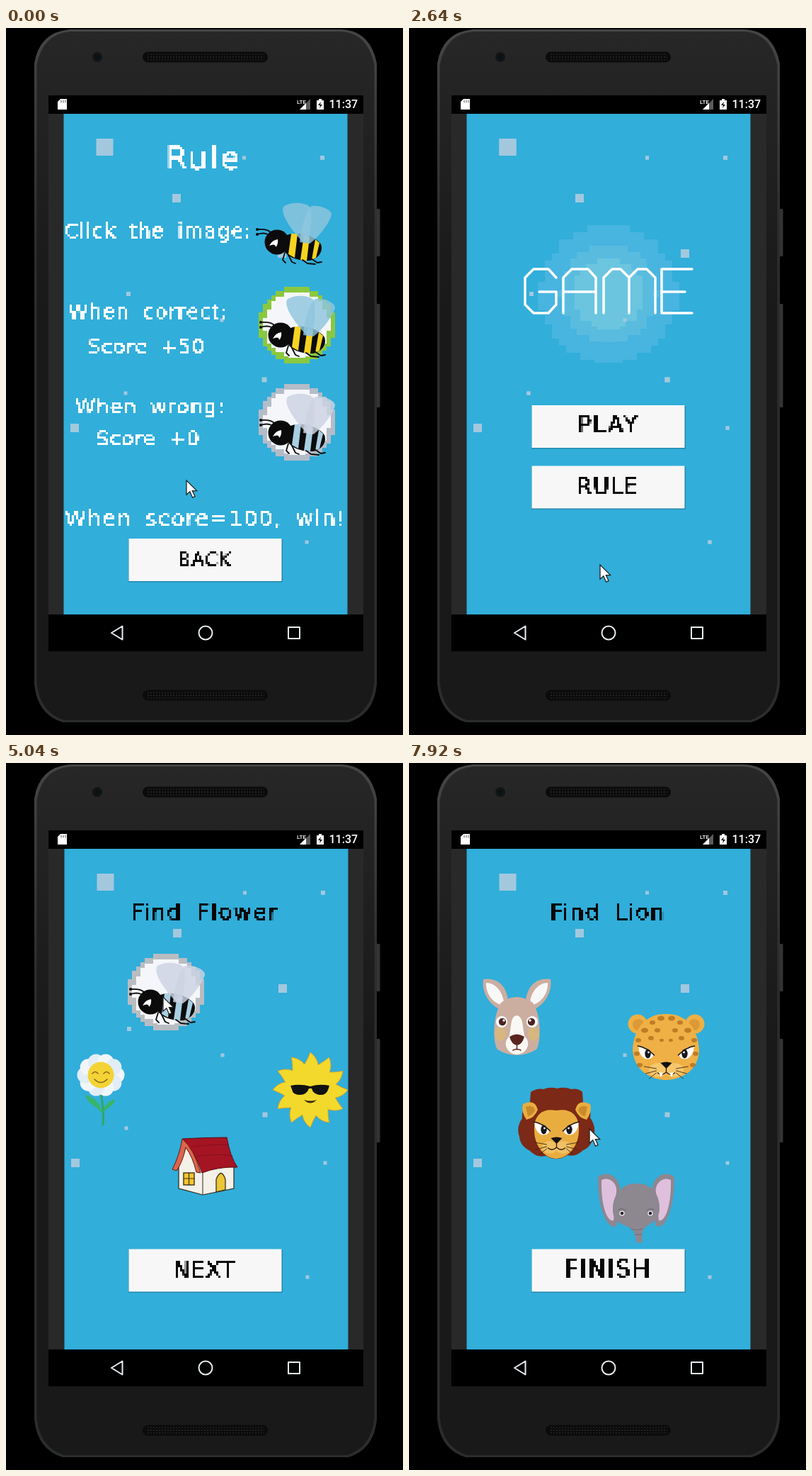
Write an HTML page that moves like this. It is 561x997 px and loops after 8000 ms.

```html
<!DOCTYPE html>
<html lang="en">
<head>
<meta charset="utf-8">
<title>Picture quiz on a phone</title>
<style>
  html, body { margin: 0; width: 100%; height: 100%; overflow: hidden; background: #000; }
  svg { display: block; width: 561px; height: 997px; }
  .label { font-family: "DejaVu Sans", sans-serif; text-anchor: middle; letter-spacing: .05em; word-spacing: .27em; stroke-width: .7; }
  .status { font-family: Roboto, sans-serif; fill: #fff; font-weight: 500; }
</style>
</head>
<body>
<svg id="stage" viewBox="0 0 561 997"></svg>
<script>
const LOOP = 8000, STEP = 240, BLUE = '#31aeda';

// ---------- helpers ----------
const path = (d, fill, extra = '') => `<path d="${d}" fill="${fill}" ${extra}/>`;
const line = (d, color, width = 1.8) =>
  path(d, 'none', `stroke="${color}" stroke-width="${width}" stroke-linecap="round" stroke-linejoin="round"`);
const rect = (x, y, w, h, fill, extra = '') =>
  `<rect x="${x}" y="${y}" width="${w}" height="${h}" fill="${fill}" ${extra}/>`;
const oval = (x, y, rx, ry, fill, extra = '') =>
  `<ellipse cx="${x}" cy="${y}" rx="${rx}" ry="${ry}" fill="${fill}" ${extra}/>`;
const dot = (x, y, r, fill, extra) => oval(x, y, r, r, fill, extra);
const at = (x, y, markup) => `<g transform="translate(${x} ${y})">${markup}</g>`;
const mirrored = (cx, markup) =>
  markup + `<g transform="translate(${2 * cx} 0) scale(-1 1)">${markup}</g>`;
const label = (text, x, y, size, color = '#fff') =>
  `<text class="label" x="${x}" y="${y}" font-size="${size}" fill="${color}" stroke="${color}">${text}</text>`;
const pixelated = markup => `<g filter="url(#pixelate)">${markup}</g>`;

const button = (y, text, size) =>
  rect(173, y + 1, 218, 60.5, '#2587ad') + rect(173.5, y, 216, 60, '#f7f7f7') +
  pixelated(label(text, 281, y + 39, size, '#080808'));

// A disc built from square cells.
function pixelDisc(cx, cy, r, cell, fill) {
  let d = '';
  for (let y = -r; y < r; y += cell) {
    const h = Math.min(cell, r - y), mid = y + h / 2;
    const half = Math.round(Math.sqrt(r * r - mid * mid) / cell) * cell;
    d += `M${cx - half} ${cy + y}h${2 * half}v${h}h${-2 * half}z`;
  }
  return path(d, fill);
}

const badge = (x, y, color) => pixelDisc(x, y, 54, 6, color) + pixelDisc(x, y, 46, 6, '#f5f6fa');

// ---------- pictures ----------
function bee(x, y, stripe = '#f5d321', wing = '#8fc6df') {
  return at(x, y,
    path('M12-9C28-17 54-9 62 3C66 14 57 24 46 26C30 27 15 21 10 12Z', '#0b0b0b') +
    path('M20-12L29-12 25 22 16 17ZM38-10L46-7 42 26 33 25ZM54-4L60 1 55 22 49 25Z', stripe) +
    path('M38 1C22-14 2-42 10-51C22-58 42-56 47-49C50-30 48-12 42 1Z', wing, 'opacity=".82"') +
    path('M32 0C34-20 40-44 49-51C60-53 78-46 77-38C72-22 54-3 46 2Z', wing, 'opacity=".82"') +
    dot(0, 0, 17.5, '#0b0b0b') +
    path('M-11 5Q-7-3 1-4Q2 3-2 7Q-2 1-11 5Z', '#fff') +
    line('M-9-14Q-14-19-27-18M-13-11Q-19-14-28-11M11 15L8 25 12 29M16 18L21 28 26 30M36 25L43 30 54 31M48 23L57 29 63 28', '#0b0b0b') +
    dot(-28, -18, 2, '#0b0b0b') + dot(-28, -11, 2, '#0b0b0b'));
}

function flower() {
  let petals = '';
  for (let i = 0; i < 10; i++) {
    const a = i * Math.PI / 5;
    petals += dot(134 + 22 * Math.cos(a), 440 + 19 * Math.sin(a), 11.5, i % 2 ? '#e2edf5' : '#f1f6fa');
  }
  return line('M134 466Q139 490 137 510', '#2fa866', 3) +
    path('M136 494C134 478 124 472 112 468C116 482 126 482 136 494ZM137 494C138 482 146 476 154 474C152 486 144 484 137 494Z', '#37b46c') +
    petals + dot(134, 440, 18.5, '#f3d335') +
    line('M122 438Q126 433 130 438M138 438Q142 433 146 438M125 446Q134 455 143 446', '#8b6a18', 1.6);
}

function sun() {
  const rays = 12, turn = 2 * Math.PI / rays, first = -Math.PI / 2 - turn * .42;
  const point = (a, r) => `${(430 + r * Math.cos(a)).toFixed(1)} ${(461 + r * Math.sin(a)).toFixed(1)}`;
  let d = 'M' + point(first, 37);
  for (let i = 0; i < rays; i++) {
    const a = first + i * turn;
    d += `Q${point(a + turn * .25, 43)} ${point(a + turn * .42, 53)}Q${point(a + turn * .8, 47)} ${point(a + turn, 37)}`;
  }
  return path(d + 'Z', '#f3d92c', 'stroke="#d9a52c" stroke-width="1"') +
    path('M402 455Q416 452 430 456Q444 452 457 455L455 461Q452 469 443 468Q434 467 432 459H428Q425 468 415 468Q405 468 404 460Z', '#111') +
    path('M421 475Q430 478 439 475Q430 484 421 475Z', '#3c2a10');
}

function house() {
  return path('M256 537L244 569V600L278 609 322 600V566L300 545Z', '#f3f1e8', 'stroke="#33241c" stroke-width="1.2"') +
    line('M278 575V608', '#33241c', 1) +
    path('M249 530Q281 528 312 528Q317 556 327 570Q300 569 277 578Q267 548 249 530Z', '#a51423', 'stroke="#5a0c14" stroke-width="1"') +
    line('M262 541Q290 538 314 538M269 555Q295 550 320 554', '#7d0f1c', .8) +
    path('M249 530Q266 544 275 578L269 577Q264 556 254 542Q250 562 241 575L235 573Q245 554 249 530Z', '#de644c', 'stroke="#5a1c14" stroke-width="1"') +
    rect(251, 578, 15, 17, '#f2c62f', 'stroke="#43301a" stroke-width="1.4"') + line('M258.5 578V595M251 586H266', '#43301a', 1.2) +
    path('M297 605V587Q304 570 310 587V602Z', '#e9c736', 'stroke="#43301a" stroke-width="1.3"');
}

function kangaroo() {
  return mirrored(152.5,
      path('M105 305C130 301 142 322 140 345L127 347C108 336 103 318 105 305Z', '#ccaea1') +
      path('M109 310C125 310 135 328 134 342C119 340 108 325 109 310Z', '#f8f8f8')) +
    path('M130 338Q152 322 175 338C188 358 186 395 180 404Q152 420 125 404C118 394 118 357 130 338Z', '#ccaea1') +
    mirrored(152.5, oval(129, 382, 8, 10, '#d7b77f') + dot(131, 365, 8, '#fff') + dot(132, 365, 5.2, '#4b2420') + dot(134, 363, 1.7, '#fff')) +
    path('M152 356C163 357 160 378 164 386C174 396 165 411 152.5 411C140 411 131 396 141 386C145 378 142 357 152 356Z', '#faf8f5') +
    path('M142 386Q152 379 163 386Q160 397 152.5 398Q145 397 142 386Z', '#5a2521') + line('M152.5 397V404M147 405Q152 402 158 405', '#5a2521', 1.5);
}

// Narrowed cat eyes with whiskers.
const catFace = (cx, y, gap) =>
  mirrored(cx,
    path(`M${cx - gap - 13} ${y - 9}Q${cx - gap - 2} ${y - 7} ${cx - gap + 8} ${y + 3}Q${cx - gap + 6} ${y + 10} ${cx - gap - 4} ${y + 8}Q${cx - gap - 13} ${y + 3} ${cx - gap - 13} ${y - 9}Z`, '#fff') +
    oval(cx - gap, y + 1, 4.2, 6.5, '#17171c') + dot(cx - gap + 1, y - 1, 1.4, '#fff') +
    line(`M${cx - gap - 14} ${y - 10}Q${cx - gap - 2} ${y - 8} ${cx - gap + 9} ${y + 3}`, '#17171c', 1.6) +
    line(`M${cx - 14} ${y + 22}L${cx - 31} ${y + 19}M${cx - 14} ${y + 25}L${cx - 29} ${y + 29}M${cx - 14} ${y + 28}L${cx - 24} ${y + 36}`, '#3b2617', .9));
const catNose = (cx, y) =>
  path(`M${cx - 8} ${y}Q${cx} ${y - 3} ${cx + 8} ${y}L${cx} ${y + 8}Z`, '#111') +
  line(`M${cx} ${y + 7}V${y + 13}Q${cx - 6} ${y + 19} ${cx - 12} ${y + 14}M${cx} ${y + 13}Q${cx + 6} ${y + 19} ${cx + 12} ${y + 14}`, '#2b1a10', 1.3);

function leopard() {
  const cx = 363.5;
  return mirrored(cx, dot(323, 368, 13.5, '#eeb044') + dot(324, 369, 8, '#dd9936')) +
    path('M363 354C389 353 408 371 410 404C410 430 390 446 363 447C337 446 317 430 316 404C318 371 338 353 363 354Z', '#efb045') +
    mirrored(cx, [[356, 360, 5], [344, 366, 4], [333, 377, 5], [351, 377, 4], [342, 388, 4], [324, 391, 4], [357, 391, 3], [322, 410, 4], [326, 426, 4]]
      .map(([x, y, r]) => oval(x, y, r, r * .72, '#bf7c25')).join('')) +
    mirrored(cx, oval(352, 433, 13, 10, '#f6c76b')) +
    catFace(cx, 409, 26) + catNose(cx, 423) +
    path('M353 436L356 443 359 437ZM368 437L371 443 374 436Z', '#fff');
}

function lion() {
  const cx = 208.5;
  return path('M172 464Q181 458 190 460Q200 456 209 459Q220 456 229 460Q239 458 245 464L246 478Q259 488 256 500Q265 513 261 526Q258 541 246 546Q236 556 224 553Q209 563 194 554Q180 557 171 547Q157 540 156 527Q151 514 160 501Q158 486 171 478Z', '#7c2917') +
    mirrored(cx, path('M161 481Q178 473 182 489Q177 501 166 503Q158 492 161 481Z', '#e9ad3f') + path('M165 485Q175 481 178 490Q174 497 168 498Z', '#c98a2b')) +
    path('M208 490C229 486 241 497 240 518C240 537 228 557 208 558C189 557 177 537 177 518C176 497 188 486 208 490Z', '#e9ad3f') +
    mirrored(cx, oval(199, 542, 11, 9, '#f0c064')) +
    catFace(cx, 516, 18) + catNose(cx, 529);
}

function elephant() {
  return mirrored(321,
      path('M267 584C281 572 300 586 298 604L294 651C284 664 266 632 267 584Z', '#8d8790') +
      path('M272 588C284 582 295 594 293 605L289 645C279 648 271 620 272 588Z', '#dfc0dc')) +
    path('M321 593C344 592 355 610 354 630C353 645 340 650 332 656Q328 664 330 675Q325 679 321 675Q320 660 312 655C298 650 288 645 288 630C288 609 300 593 321 593Z', '#8d8790') +
    mirrored(321, dot(301, 635, 3.6, '#eee') + dot(301, 635, 2.3, '#26242a') + line('M296 630Q301 627 306 631', '#65606a', 1)) +
    line('M314 657Q321 660 330 657M319 665H329', '#706a74', 1);
}

function glow() {
  return pixelDisc(282, 375, 97, 10, '#48b4e0') + pixelDisc(282, 375, 68, 9, '#59bcdf') + pixelDisc(282, 375, 50, 8, '#6bc5df');
}

// ---------- app screens ----------
const sparkles = [[139.5, 168, 24], [241, 240, 12], [336.5, 183, 5], [447, 183, 6], [390, 318, 12], [173, 375, 6],
  [305, 412, 5], [365, 496, 7], [169, 515, 5], [97, 564, 12], [450, 564, 5], [425, 725, 5]]
  .map(([x, y, s]) => rect(x - s / 2, y - s / 2, s, s, '#a3c8de')).join('');

const screen = (id, content, shift = 0) => `<g id="${id}">` +
  rect(60, 95, 445, 26, '#000') + rect(60, 121, 445, 706, '#292929') +
  rect(81.5 + shift, 121, 401, 706, BLUE) + at(shift, 0, sparkles) + content + '</g>';

const ruleScreen = screen('rule',
  pixelated(label('Rule', 279, 199, 45) + label('Click the image:', 215, 296, 28) +
    label('When correct:', 201, 410, 28.5) + label('Score +50', 198.5, 459, 28) +
    label('When wrong:', 204, 544, 28.5) + label('Score +0', 201, 589, 28) +
    label('When score=100, win!', 282, 702, 30.8)) +
  bee(383, 302) +
  badge(411, 419, '#8ac83f') + bee(388, 433) +
  badge(411, 556, '#b4bcc8') + bee(388, 571, '#a9cfe2', '#ccd3e2') +
  button(720, 'BACK', 26.5));

const titleScreen = screen('title',
  glow() + sparkles +
  '<g role="img" aria-label="GAME">' +
  line('M208 352L197 340H176L164 352V390L176 402H197L208 390V372H184M218 402V352L230 340H253L264 352V402M218 372H264' +
    'M275 402V352L287 340H299L311 352V402M311 352L323 340H336L348 352V402M400 340H357V402H400M357 372H390', '#fff', 3.5) + '</g>' +
  rect(171, 535, 221, 64, '#1e7fa6', 'id="press" rx="3" opacity=".55"') +
  button(532, 'PLAY', 33.5) + button(617.5, 'RULE', 31.5));

const flowerScreen = screen('flower',
  pixelated(label('Find Flower', 281, 221, 32, '#080808')) +
  `<g id="beeIdle">${bee(204, 337)}</g>` +
  `<g id="beeWrong">${badge(226, 323, '#b9bdc2') + bee(204, 337, '#a9cfe2', '#ccd3e2')}</g>` +
  flower() + sun() + house() + button(685.5, 'NEXT', 31), 1);

const lionScreen = screen('lion',
  pixelated(label('Find Lion', 281, 221, 31.5, '#080808')) +
  kangaroo() + leopard() + lion() + elephant() + button(685.5, 'FINISH', 34));

// ---------- phone ----------
const speaker = y => rect(193, y, 177, 15, '#0b0b0b', 'rx="7.5"') + rect(198, y + 3, 167, 9, 'url(#mesh)');
const phone =
  rect(523, 255, 5.5, 67, '#343434', 'rx="1.5"') + rect(523, 389, 5.5, 146, '#343434', 'rx="1.5"') +
  path('M90 2H474Q515 4 524 50V925Q520 968 484 979H80Q44 968 40 925V50Q47 6 90 2Z', 'url(#rim)') +
  path('M91 5H473Q511 7 520.5 52V923Q517 965 482 976H82Q47 965 43.5 923V52Q52 8 91 5Z', 'url(#body)') +
  dot(129, 41, 7, '#141414') + dot(129, 41, 3.5, '#071318') +
  speaker(33.5) + speaker(933.5) + rect(60, 95, 445, 784, '#000');

const systemIcons =
  path('M77 100H86V115H73V104Z', '#fff') + line('M78 102V105M81 102V105M84 102V105', '#555', 1) +
  '<text class="status" x="411" y="107" font-size="8">LTE</text>' +
  path('M430 100V115H415Z', '#5b5b5b') + path('M424 106V115H415Z', '#fff') +
  path('M442 100H446V102H449V115H439V102H442Z', '#fff') + path('M445 104L441 109H444L443 113 447 108H444Z', '#000') +
  '<text class="status" x="456.5" y="113" font-size="16">11:37</text>' +
  line('M149 853L164.5 843.5V862.5ZM399 845H415V861H399Z', '#e8eef0', 2) +
  dot(282, 853, 9.5, 'none', 'stroke="#e8eef0" stroke-width="2"');

const defs = `<defs>
  <linearGradient id="rim" x2="0" y2="1"><stop stop-color="#454545"/><stop offset=".3" stop-color="#2b2d2d"/><stop offset="1" stop-color="#2b2d2d"/></linearGradient>
  <linearGradient id="body" x2="0" y2="1"><stop stop-color="#272727"/><stop offset=".1" stop-color="#232323"/><stop offset=".4" stop-color="#191919"/><stop offset="1" stop-color="#191919"/></linearGradient>
  <pattern id="mesh" width="4" height="4" patternUnits="userSpaceOnUse"><rect width="2" height="2" fill="#222"/></pattern>
  <filter id="pixelate" filterUnits="userSpaceOnUse" x="0" y="0" width="561" height="997" color-interpolation-filters="sRGB">
    <feFlood x="1" y="1" width="1" height="1"/>
    <feComposite x="0" y="0" width="3" height="3"/>
    <feTile result="grid"/>
    <feComposite in="SourceGraphic" in2="grid" operator="in"/>
    <feComponentTransfer><feFuncA type="linear" slope="4" intercept="-1.4"/></feComponentTransfer>
    <feMorphology operator="dilate" radius="1"/>
  </filter></defs>`;

const cursorArrow = `<g id="cursor">${path('M0 0V20L4.8 15.8 8.6 24.2 12 22.6 8.4 14.6H14.6Z', '#fff', 'stroke="#222" stroke-width="1.3"')}</g>`;

const stage = document.getElementById('stage');
stage.innerHTML = defs + rect(0, 0, 561, 997, '#000') + phone +
  ruleScreen + titleScreen + flowerScreen + lionScreen + systemIcons + cursorArrow;
const part = id => stage.querySelector('#' + id);

// ---------- motion ----------
const scenes = [['rule', -1000], ['title', 2084], ['flower', 3700], ['lion', 6681]]
  .map(([id, start]) => ({ node: part(id), start }));
const cursorKeys = [[0, 255, 638], [1200, 255, 638], [1920, 270, 757], [2640, 270, 757], [3360, 286, 560], [4080, 286, 560],
  [4800, 222, 330], [5160, 222, 330], [5760, 281, 737], [6000, 281, 737], [6480, 275, 710], [6960, 275, 710], [7920, 255, 516]];
const cursor = part('cursor'), press = part('press'), beeIdle = part('beeIdle'), beeWrong = part('beeWrong');
const show = (node, visible) => node.setAttribute('display', visible ? 'inline' : 'none');

function cursorAt(t) {
  const i = Math.max(1, cursorKeys.findIndex(([time]) => time >= t));
  const [t0, x0, y0] = cursorKeys[i - 1], [t1, x1, y1] = cursorKeys[i];
  const p = (t - t0) / (t1 - t0), ease = p * p * (3 - 2 * p);
  return [x0 + (x1 - x0) * ease, y0 + (y1 - y0) * ease];
}

function draw() {
  const t = Math.floor(performance.now() % LOOP / STEP) * STEP;
  for (const { node, start } of scenes) {
    // A new screen fades in while it rises and slows down.
    const p = Math.min(1, Math.max(0, (t - start) / 350));
    show(node, p > 0);
    node.setAttribute('opacity', Math.min(1, 2.3 * p));
    node.setAttribute('transform', `translate(0 ${Math.round(62 * (1 - p) ** 2)})`);
  }
  show(beeIdle, t < 5040);
  show(beeWrong, t >= 5040);
  show(press, t >= 3600);
  cursor.setAttribute('transform', `translate(${cursorAt(t)})`);
  requestAnimationFrame(draw);
}
draw();
</script>
</body>
</html>
```
